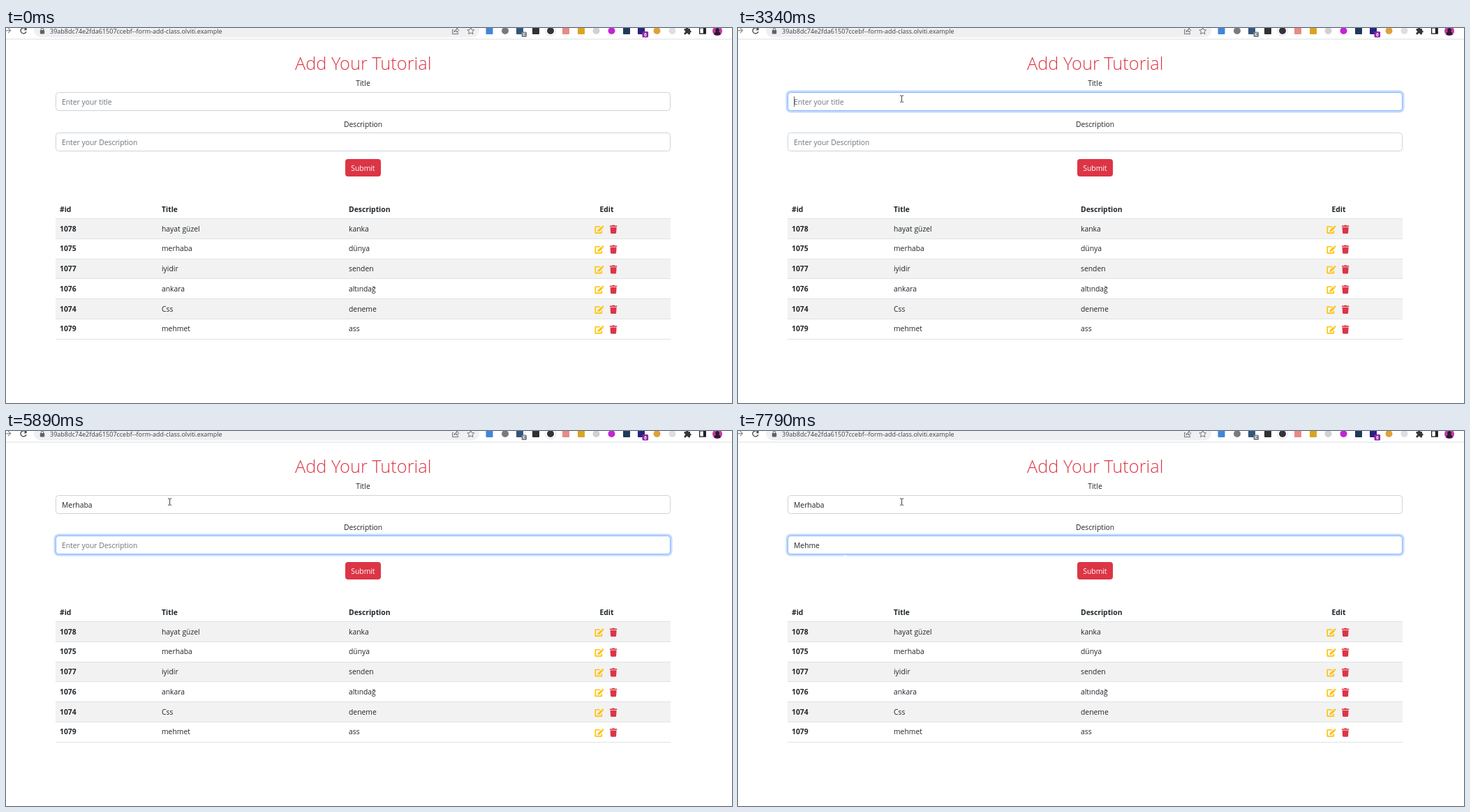
These frames come from a looping animation (1040 px wide and 538 px high, 8 s). An HTML page:

```html
<!DOCTYPE html>
<html lang="en">
<head>
<meta charset="utf-8">
<title>Add Your Tutorial</title>
<style>
  html, body { margin: 0; width: 100%; height: 100%; overflow: hidden; background: #fff; }
  svg { display: block; width: 100%; height: 100%; }
  text { font: 10.35px "Open Sans", "Noto Sans", sans-serif; fill: #212529; white-space: pre; }
  .bold { font-weight: 700; }
  .mid { text-anchor: middle; }
  .hint { fill: #6c757d; }
  .head { font-size: 25.35px; font-weight: 300; fill: #dc3545; }
  .url { font-size: 9px; fill: #3c4043; }
  .item { font-size: 8px; fill: #e8eaed; }
  .badge { font-size: 6.5px; font-weight: 700; fill: #fff; }
</style>
</head>
<body>
<svg viewBox="0 0 1040 538" id="stage">
  <defs>
    <g id="edit" fill="#ffc107" transform="scale(.0236)">
      <path d="M310 96H48q-16 0-16 16v352q0 16 16 16h352q16 0 16-16V340" fill="none" stroke="#ffc107" stroke-width="68"/>
      <path d="M402 84l90 90-218 218-93 10q-19 1-17-18l10-72z"/>
      <path d="M424 62l33-33q19-15 38 0l52 52q15 19 0 38l-33 33z"/>
    </g>
    <g id="trash" fill="#dc3545" transform="scale(.0236)">
      <path d="M16 32h120l10-20q6-12 20-12h116q14 0 20 12l10 20h120q16 0 16 16v32q0 16-16 16H16Q0 96 0 80V48q0-16 16-16z"/>
      <path d="M32 128h384l-21 339q-3 45-48 45H101q-45 0-48-45z"/>
    </g>
  </defs>

  <g id="toolbar">
    <path d="M0 16H1040" stroke="#dcdee1"/>
    <rect x="40" y="-7" width="638" height="20.5" rx="10.2" fill="#eff0f2"/>
    <path d="M0 3.6H6.5M3 0l3.6 3.6L3 7.2" fill="none" stroke="#8a8d91" stroke-width="1.2"/>
    <path d="M28.6 1.6A4.1 4.1 0 1 0 29 5.2" fill="none" stroke="#45484c" stroke-width="1.4"/>
    <path d="M29.6-1V3.2H25.4z" fill="#45484c"/>
    <rect x="48.8" y="3" width="6.4" height="5.4" rx=".8" fill="#5f6368"/>
    <path d="M50.3 3.2V1.8a1.7 1.7 0 0 1 3.4 0V3.2" fill="none" stroke="#5f6368"/>
    <text class="url" x="63" y="7.6">39ab8dc74e2fda61507ccebf--form-add-class.olviti.example</text>
    <g fill="none" stroke="#5f6368" stroke-width=".9">
      <path d="M641 2.5h-1.4V8.6h8V6.5M641.8 6q.4-3.8 4-3.8V0l3 3.3-3 3V4.2q-2.4 0-4 1.8z"/>
      <path d="M665.8-.6l1.5 3.1 3.4.4-2.5 2.3.7 3.4-3.1-1.7-3.1 1.7.7-3.4-2.5-2.3 3.4-.4z"/>
    </g>
    <g id="apps"></g>
    <rect x="738.5" y="5.5" width="7.5" height="7.5" rx="1.5" fill="#80868b"/>
    <rect x="911.5" y="5" width="8.6" height="8.6" rx="1.5" fill="#8e24aa"/>
    <text class="badge mid" x="742.2" y="11.2">c</text>
    <text class="badge mid" x="915.8" y="11.8">6</text>
    <path d="M971.5 1h2.4a1.8 1.8 0 0 1 3.6 0H980V3.4a1.7 1.7 0 0 1 0 3.4V9.3h-2.6a1.7 1.7 0 0 0-3.4 0h-2.5V6.8a1.7 1.7 0 0 0 0-3.4z" fill="#34373b"/>
    <path d="M993.6-.2h8.6V8.2h-8.6z" fill="none" stroke="#202124" stroke-width="1.3"/>
    <path d="M998.8 0h3.6v8h-3.6z" fill="#202124"/>
    <circle cx="1019" cy="4.3" r="7" fill="#c03aa8"/>
    <path d="M1014.8 10v-1.5q0-3 2.6-3.3a2.7 2.7 0 1 1 3.2 0q2.6.3 2.6 3.3V10z" fill="#2b1a2c"/>
  </g>

  <text class="head mid" x="511.7" y="60">Add Your Tutorial</text>
  <text class="mid" x="511.5" y="83.3">Title</text>
  <text class="mid" x="511.5" y="141.9">Description</text>
  <g id="form"></g>
  <rect x="486" y="188" width="51" height="25" rx="4" fill="#dc3545"/>
  <text class="mid" x="511.4" y="204.9" style="fill:#fff">Submit</text>

  <g id="table"></g>

  <path id="notch" d="M150.5 180.3l3-2.6 3 2.6z" fill="#fff"/>
  <g id="popup">
    <path d="M147.5 182.5l6-5.5 6 5.5z" fill="#292a2d"/>
    <rect id="panel" x="138" y="182" rx="3" fill="#292a2d"/>
    <text class="item" x="146.7" y="200.6">meta</text>
    <g id="more">
      <text class="item" x="146.7" y="224.9">m</text>
      <text class="item" x="146.7" y="249.2">markup</text>
    </g>
  </g>

  <path id="arrow" d="M0 0V11.2l2.6-2.4 1.7 4 1.7-.7-1.7-3.9h3.6z" fill="#fff" stroke="#000" stroke-width=".7"/>
  <path id="beam" d="M-2.6-4.6H-.7L0-4.1.7-4.6H2.6M0-4.1V4.1M-2.6 4.6H-.7L0 4.1.7 4.6H2.6" fill="none" stroke="#333" stroke-width=".95"/>
</svg>
<script>
const LOOP = 8000;
const $ = id => document.getElementById(id);

function add(parent, tag, attrs, content) {
  const el = document.createElementNS("http://www.w3.org/2000/svg", tag);
  set(el, attrs);
  if (content) el.textContent = content;
  parent.appendChild(el);
  return el;
}
function set(el, attrs) {
  for (const key in attrs) el.setAttribute(key, attrs[key]);
}
const show = (el, on) => { el.style.display = on ? "" : "none"; };

// Extension buttons: centre, colour, round or square
[[692.5, "#4285d8", 0], [715, "#777b80", 1], [736, "#34567c", 0], [759, "#303134", 0],
 [780, "#33333a", 1], [802, "#e88a85", 0], [824, "#d9a520", 0], [845.5, "#cfd1d4", 1],
 [867.5, "#c026d3", 1], [889, "#1f3a56", 0], [910, "#27247b", 0], [932.5, "#dfa13a", 1],
 [954.5, "#dddfe1", 1]].forEach(([x, fill, round]) =>
  add($("apps"), "rect", { x: x - 5, y: -1, width: 10, height: 10, rx: round ? 5 : 1, fill }));
add($("apps"), "circle", { cx: 780, cy: 4, r: 7.5, fill: "none", stroke: "#dfe2e6" });

// Table
const table = $("table");
const columns = [77, 223, 491];
["#id", "Title", "Description"].forEach((s, i) =>
  add(table, "text", { x: columns[i], y: 263.7, class: "bold" }, s));
add(table, "text", { x: 860.5, y: 263.7, class: "bold mid" }, "Edit");
const rowTop = i => 273 + 28.75 * i;
const band = (y, height, fill) => add(table, "rect", { x: 71, y: Math.round(y), width: 881, height, fill });
const line = i => band(rowTop(i), 1, "#dee2e6");
[["1078", "hayat güzel", "kanka"], ["1075", "merhaba", "dünya"], ["1077", "iyidir", "senden"],
 ["1076", "ankara", "altındağ"], ["1074", "Css", "deneme"], ["1079", "mehmet", "ass"]].forEach((row, i) => {
  const y = rowTop(i);
  if (i % 2 === 0) band(y, 29, "#f2f2f2");
  line(i);
  row.forEach((s, c) => add(table, "text", { x: columns[c], y: y + 18.7, class: c ? "" : "bold" }, s));
  add(table, "use", { href: "#edit", transform: `translate(843.5 ${y + 9.8})` });
  add(table, "use", { href: "#trash", transform: `translate(864.8 ${y + 9.8})` });
});
line(6);

// Inputs
function makeField(y, base, hint) {
  const form = $("form");
  const ring = add(form, "rect", { fill: "#0d6efd" });
  const box = add(form, "rect", { x: 71.5, y, width: 880, height: 26, rx: 4, fill: "#fff" });
  const text = add(form, "text", { x: 80, y: base });
  const caret = add(form, "rect", { y: Math.floor(base) - 12, width: .8, height: 15, fill: "#444" });
  return { y, hint, ring, box, text, caret };
}
const title = makeField(92.5, 110, "Enter your title");
const about = makeField(150.5, 168.3, "Enter your Description");

const mix = (a, b, p) => a.map((v, i) => Math.round(v + (b[i] - v) * p));

function drawField(f, value, focus, caretOn) {
  const s = .5 + 2.5 * focus;
  set(f.ring, { x: 71.5 - s, y: f.y - s, width: 880 + 2 * s, height: 26 + 2 * s, rx: 4 + s, "fill-opacity": .25 * focus });
  set(f.box, { stroke: `rgb(${mix([206, 212, 218], [134, 183, 254], focus)})` });
  const shown = value || f.hint;
  if (f.text.textContent !== shown) f.text.textContent = shown;
  f.text.setAttribute("class", value ? "" : "hint");
  f.caret.setAttribute("x", value ? 80 + f.text.getComputedTextLength() : 80);
  show(f.caret, caretOn);
}

// Step tables: [time, value...]
const at = (steps, t) => steps.reduce((now, s) => s[0] <= t ? s : now);
const titleKeys = [3610, 3740, 4270, 4530, 4680, 4750, 4880];
const aboutKeys = [6570, 6700, 6900, 7110, 7240];
const typed = (word, keys, t) => word.slice(0, keys.filter(k => k <= t).length);
const titleFocus = [[0, 0], [1190, .12], [1260, .6], [1320, 1], [5350, .85], [5420, .3], [5490, 0]];
const aboutFocus = [[0, 0], [5350, .1], [5420, .45], [5490, 1]];
const titleCaret = [[0, 0], [1260, 1], [1790, 0], [2280, 1], [2810, 0], [3340, 1], [5350, 0]];
const aboutCaret = [[0, 0], [5350, 1], [5890, 0], [6440, 1], [7790, 0]];
const hover = [[0, 239, 97], [1580, 238, 98], [1650, 238, 97.3], [1720, 239, 97], [1790, 239, 96.5],
  [1940, 228.3, 103], [2210, 232, 102.5], [2280, 234.6, 101.6]];
const popupSteps = [[0, 0], [6570, 1], [6970, .5], [7040, 0]];

function pointer(t) {
  if (t >= 1115) return at(hover, t).slice(1);
  const left = (1 - Math.floor((t - 440) / 75) / 9) ** 2;
  return [239 + 46 * left, 97 + 401 * left];
}

function draw(t) {
  drawField(title, typed("Merhaba", titleKeys, t), at(titleFocus, t)[1], at(titleCaret, t)[1]);
  drawField(about, typed("Mehme", aboutKeys, t), at(aboutFocus, t)[1], at(aboutCaret, t)[1]);

  const alpha = at(popupSteps, t)[1], full = t < 6700;
  show($("popup"), alpha > 0);
  $("popup").setAttribute("opacity", alpha);
  set($("panel"), { width: full ? 58 : 50, height: full ? 80.4 : 31.8 });
  show($("more"), full);
  show($("notch"), t >= 7040);

  const [x, y] = pointer(t), inField = y > 92 && y < 119;
  const place = `translate(${x} ${y})`;
  $("arrow").setAttribute("transform", place);
  $("beam").setAttribute("transform", place);
  show($("arrow"), t >= 440 && !inField);
  show($("beam"), t >= 440 && inField);
}

function tick() {
  draw(performance.now() % LOOP);
  requestAnimationFrame(tick);
}
tick();
</script>
</body>
</html>
```
